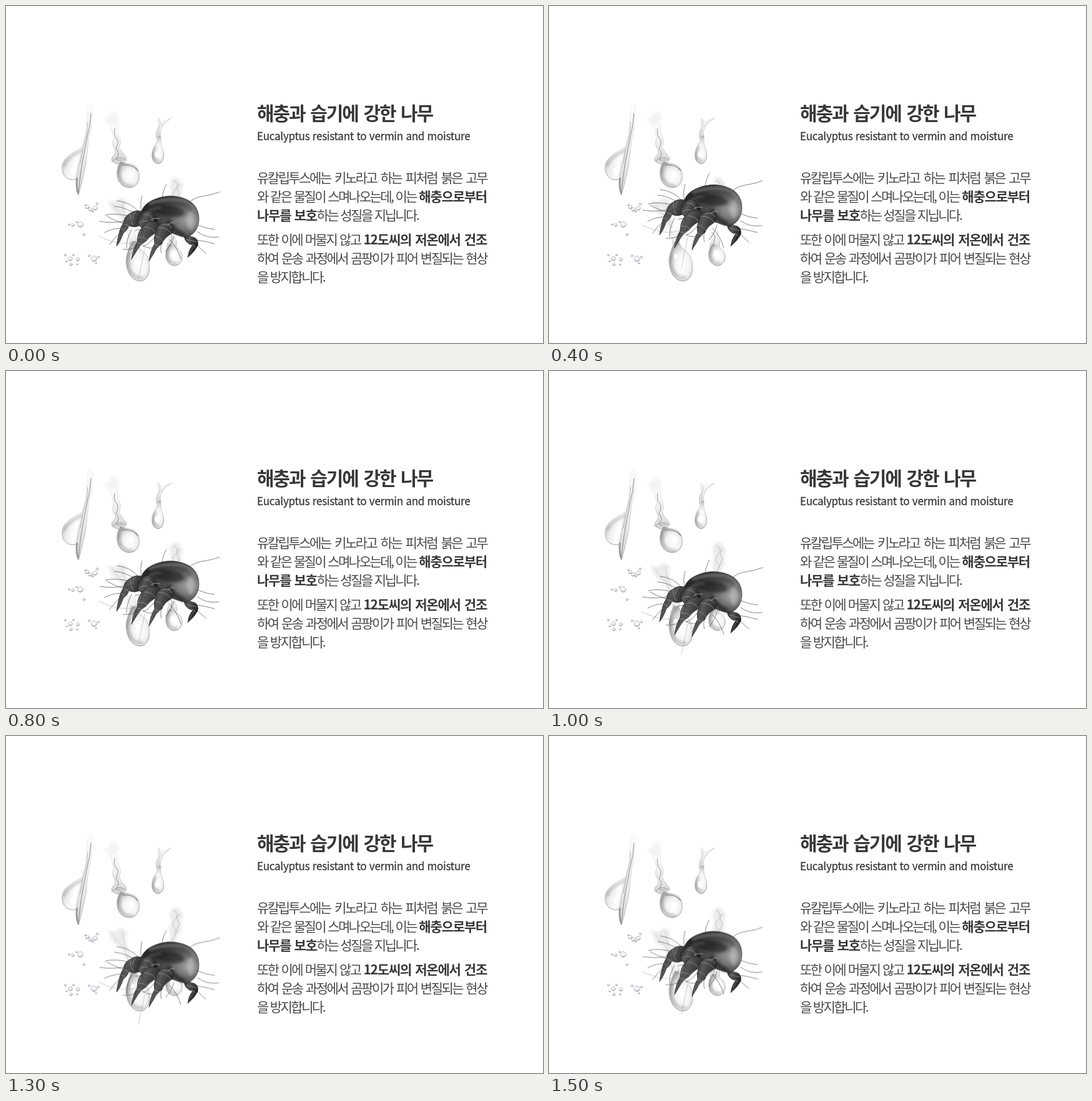
Animation of 860x540 px, one loop 1.6 s. Source, as an HTML page:

```html
<!DOCTYPE html>
<html lang="ko">
<head>
<meta charset="utf-8">
<title>해충과 습기에 강한 나무</title>
<style>
  html, body { margin: 0; width: 100%; height: 100%; overflow: hidden; background: #fff; }
  body { position: relative; color: #38383a; font-family: 'Noto Sans CJK KR', 'Noto Sans CJK', 'Noto Sans CJK JP', sans-serif; }
  svg { position: absolute; left: 0; top: 0; }
  h1, h2, p { position: absolute; left: 402px; margin: 0; white-space: nowrap; }
  h1 { top: 148px; font-size: 30px; line-height: 44px; font-weight: 700; letter-spacing: -2.1px; word-spacing: 2.4px; }
  h2 { top: 195px; font-size: 17px; line-height: 25px; font-weight: 400; letter-spacing: -.26px; -webkit-text-stroke: .3px; }
  p { width: 368px; font-size: 21px; line-height: 30px; font-weight: 300; letter-spacing: -2.5px; word-spacing: .5px; color: #48484a; }
  p span { display: block; }
  .full { text-align-last: justify; }
  b { font-weight: 700; letter-spacing: -1.2px; color: #38383a; }

  #mite { animation: crawl 1.6s infinite steps(4, end); }
  @keyframes crawl {
    0%, 50%, 100% { transform: translateY(0); }
    25% { transform: translateY(-18px); }
    75% { transform: translateY(34px); }
  }
</style>
</head>
<body>
<svg width="860" height="540" viewBox="0 0 860 540" fill="none" stroke-linecap="round" stroke-linejoin="round">
  <defs>
    <radialGradient id="water" cx=".58" cy=".6" r=".6">
      <stop offset="0" stop-color="#fff"/>
      <stop offset=".5" stop-color="#f4f4f4"/>
      <stop offset=".8" stop-color="#d2d2d2"/>
      <stop offset="1" stop-color="#a0a0a0"/>
    </radialGradient>
    <linearGradient id="pale" x1="0" y1="0" x2="1" y2=".3">
      <stop offset="0" stop-color="#b8b8b8"/>
      <stop offset=".35" stop-color="#ececec"/>
      <stop offset=".7" stop-color="#fff"/>
      <stop offset="1" stop-color="#dcdcdc"/>
    </linearGradient>
    <linearGradient id="stream" x1="0" y1="0" x2="0" y2="1">
      <stop offset="0" stop-color="#fcfcfc"/>
      <stop offset=".5" stop-color="#efefef"/>
      <stop offset="1" stop-color="#d4d4d4"/>
    </linearGradient>
    <linearGradient id="edge" x1="0" y1="0" x2="0" y2="1">
      <stop offset="0" stop-color="#ececec"/>
      <stop offset="1" stop-color="#929292"/>
    </linearGradient>
    <radialGradient id="body" cx=".82" cy=".6" r=".75">
      <stop offset="0" stop-color="#a0a0a0"/>
      <stop offset=".2" stop-color="#848484"/>
      <stop offset=".5" stop-color="#525252"/>
      <stop offset="1" stop-color="#262626"/>
    </radialGradient>
    <linearGradient id="limb" x1="0" y1="0" x2="1" y2=".5">
      <stop offset="0" stop-color="#151515"/>
      <stop offset=".45" stop-color="#585858"/>
      <stop offset="1" stop-color="#1c1c1c"/>
    </linearGradient>
    <filter id="soft" x="-20%" y="-20%" width="140%" height="140%"><feGaussianBlur stdDeviation=".5"/></filter>
    <filter id="haze" x="-40%" y="-40%" width="180%" height="180%"><feGaussianBlur stdDeviation="2.2"/></filter>
  </defs>
  <g id="drops" filter="url(#soft)"></g>
  <g id="bubbles"></g>
  <g id="mite"></g>
</svg>

<h1>해충과 습기에 강한 나무</h1>
<h2>Eucalyptus resistant to vermin and moisture</h2>
<p style="top:259px">
  <span class="full">유칼립투스에는 키노라고 하는 피처럼 붉은 고무</span>
  <span class="full">와 같은 물질이 스며나오는데, 이는 <b>해충으로부터</b></span>
  <span><b>나무를 보호</b>하는 성질을 지닙니다.</span>
</p>
<p style="top:358px">
  <span class="full">또한 이에 머물지 않고 <b>12도씨의 저온에서 건조</b></span>
  <span class="full">하여 운송 과정에서 곰팡이가 피어 변질되는 현상</span>
  <span>을 방지합니다.</span>
</p>

<script>
  const NS = 'http://www.w3.org/2000/svg';
  const layer = id => document.getElementById(id);
  const drops = layer('drops'), bubbles = layer('bubbles'), mite = layer('mite');

  function add(parent, tag, attrs) {
    const el = document.createElementNS(NS, tag);
    for (const key in attrs) el.setAttribute(key, attrs[key]);
    return parent.appendChild(el);
  }
  const fill = (parent, d, color, more) => add(parent, 'path', { d, fill: color, ...more });
  const line = (parent, d, color, width = 1, more) =>
    add(parent, 'path', { d, stroke: color, 'stroke-width': width, ...more });
  const spot = (parent, cx, cy, rx, ry, color, more) =>
    add(parent, 'ellipse', { cx, cy, rx, ry, fill: color, ...more });
  const haze = { filter: 'url(#haze)' };

  const stream = d => fill(drops, d, 'url(#stream)', { stroke: 'url(#edge)', 'stroke-width': .6 });
  function drop(d, paint, shade, x, y) {
    fill(drops, d, `url(#${paint})`, { stroke: 'url(#edge)', 'stroke-width': .9 });
    line(drops, shade, '#666', 2.4, { opacity: .6, ...haze });
    spot(drops, x, y, 4, 5, '#fff');
  }

  // left streak and its wide drop
  drop('M127 221C120 232 92 236 90 258C89 273 100 280 111 278C121 275 124 262 124 246Z', 'pale',
    'M124 230C112 236 98 243 93 256', 107, 264);
  stream('M132 159Q137 154 139 161L137 183Q138 197 133 210L130 234Q129 254 124 272Q120 290 116 303Q111 295 112 279Q116 255 121 237Q122 224 126 212Q130 194 129 181Z');
  line(drops, 'M136 172L134 192Q131 205 128 221T122 252Q119 270 116 298', '#888', 1);
  line(drops, 'M131 186Q131 204 125 222L119 252', '#aaa', .8);
  line(drops, 'M114 276Q112 290 116 301', '#888', 1.8);

  // middle stream
  fill(drops, 'M152 180Q162 185 168 170Q178 166 180 178Q177 188 180 194L169 197Q164 186 152 180Z', '#f4f4f4', haze);
  stream('M170 188Q177 188 179 194Q177 202 182 209Q185 218 181 226Q185 234 191 241Q196 246 190 249Q182 257 174 251Q166 249 171 241Q178 236 173 228Q168 219 173 211Q169 201 168 193Z');
  line(drops, 'M174 196Q172 206 177 212T176 228Q183 236 178 242T186 247M171 248Q180 239 191 246', '#8a8a8a', .9);
  drop('M183 248C176 260 176 275 183 284C192 294 206 292 211 283C217 271 212 257 203 254C195 251 190 252 183 248Z', 'water',
    'M182 262C178 276 188 289 202 288', 201, 270);
  line(drops, 'M187 255Q204 253 211 264', '#777', 1.1);

  // right stream
  stream('M242 179Q247 178 248 186Q256 182 266 179Q254 188 250 194Q246 201 247 209L242 214Q238 204 244 194Z');
  line(drops, 'M245 181L247 190Q243 199 244 210M264 180Q252 187 249 193', '#bbb', .8);
  drop('M243 208C243 221 233 228 234 241C235 250 241 254 246 252C254 248 254 236 250 227C247 220 249 214 248 207Z', 'water',
    'M239 226C234 238 238 249 246 249', 242, 238);

  // lower pair behind the mite
  fill(drops, 'M163 310Q174 318 183 307L194 313Q190 326 196 345L206 367L194 363Q188 340 176 334Q168 330 163 310Z', '#ebebeb', haze);
  line(drops, 'M171 318Q180 333 188 337L197 362M187 313Q186 329 197 347', '#ccc', .8);
  stream('M195 357Q202 350 208 357Q205 366 209 374Q208 382 211 390L197 391Q200 378 196 370Z');
  drop('M201 377C195 391 190 403 194 420C198 437 211 444 221 439C231 433 232 416 227 403C222 391 211 389 208 376Z', 'water',
    'M197 398C190 415 202 438 218 435', 211, 410);
  spot(drops, 203, 401, 3, 4, '#fff');
  fill(drops, 'M265 277Q275 271 279 281Q287 287 280 296Q284 309 276 318L270 335L260 333Q266 318 261 309Q267 297 262 289Z', '#ebebeb', haze);
  line(drops, 'M268 279Q279 286 271 294T270 308T264 329M278 285Q270 292 278 300L272 315', '#b4b4b4', .8);
  stream('M259 358Q267 353 271 361L270 371Q277 379 271 389L259 391Q256 381 262 375Q256 367 259 358Z');
  line(drops, 'M261 363Q268 367 265 375T267 388', '#8a8a8a', .9);
  drop('M262 380C255 389 254 402 259 410C266 419 277 417 281 408C285 398 279 389 271 385Z', 'water',
    'M260 390C254 402 264 415 273 412', 268, 397);

  // bubbles: x, y, radius
  [
    [130, 322, 3], [135, 326, 3], [143, 324, 3.4], [146, 317, 1.8], [127, 319, 1.2], [139, 329, 1.4],
    [119, 350, 4.6], [107, 351, 2.4], [101, 350, 1.4], [125, 366, 1.8], [113, 346, 1.2],
    [95, 399, 1.6], [103, 405, 3.4], [104, 414, 2.2], [115, 406, 2.8], [97, 409, 1.2], [114, 414, 1.2],
    [141, 405, 4.6], [133, 400, 1.6], [148, 402, 1.6], [144, 412, 1.2], [108, 399, 1.4]
  ].forEach(([cx, cy, r], i) => {
    add(bubbles, 'circle', { cx, cy, r, fill: '#f1f1f3', stroke: i % 4 == 1 ? '#b6b2c8' : '#bbb', 'stroke-width': .8 });
    line(bubbles, `M${cx - r * .7} ${cy + r * .5}Q${cx} ${cy + r * 1.3} ${cx + r * .8} ${cy + r * .3}`, '#888', .8);
    add(bubbles, 'circle', { cx: cx - r * .2, cy: cy - r * .2, r: r * .35, fill: '#fff' });
  });

  // hairs behind the body
  line(mite, [
    'M287 321Q298 307 314 305T342 298', 'M250 306Q252 294 257 286', 'M217 330Q214 316 218 304',
    'M213 330Q199 314 178 312', 'M207 333Q190 322 174 321', 'M198 337Q176 331 159 335',
    'M192 344Q170 349 150 345', 'M190 349Q174 344 162 337', 'M186 356Q170 356 158 363',
    'M185 361Q173 372 166 382', 'M201 358Q193 372 193 388', 'M212 381Q205 392 187 390',
    'M245 386Q229 391 219 384', 'M262 374Q274 386 280 405', 'M307 351Q321 357 334 358',
    'M307 362Q321 373 341 370', 'M305 375Q316 376 334 381', 'M306 383Q313 391 320 396',
    'M269 369Q266 382 256 393'
  ].join(''), '#444', .65);
  line(mite, 'M222 389Q217 414 212 437M214 376Q188 388 149 369', '#aaa', .6);

  const part = (d, paint = 'limb') => fill(mite, d, `url(#${paint})`, { stroke: '#1c1c1c', 'stroke-width': .6 });
  const glint = (d, color = '#a0a0a0', width = .9) => line(mite, d, color, width, { opacity: .8 });

  // rear leg
  part('M283 361Q292 369 302 371Q309 375 307 384Q302 394 291 403Q292 392 299 383Q291 382 287 375Z');
  glint('M289 374Q298 376 305 378M298 382L303 386');

  // body
  part('M216 336C216 323 226 314 240 309C255 303 272 303 287 309C300 314 309 325 309 341C309 357 299 370 286 370C271 368 261 359 246 361C230 363 217 354 216 336Z', 'body');
  spot(mite, 262, 329, 24, 9, '#161616', { opacity: .55, transform: 'rotate(8 262 329)', ...haze });
  line(mite, 'M230 317Q252 307 282 311Q297 315 303 329', '#a8a8a8', 2.6, { opacity: .75, ...haze });
  line(mite, 'M226 331Q236 322 248 324', '#999', 2.4, { opacity: .5, ...haze });
  spot(mite, 296, 344, 6, 15, '#d0d0d0', { opacity: .45, ...haze });
  line(mite, 'M261 345Q268 359 284 367', '#0c0c0c', 6, { opacity: .6, ...haze });

  // front leg
  part('M220 330Q209 325 199 332Q189 337 188 348Q181 356 177 385Q183 378 188 364Q194 360 197 352Q207 357 217 350Z');
  glint('M199 334Q199 345 204 351M189 349Q193 350 197 353M184 357Q188 358 190 360M207 331Q202 336 203 342');

  // head plates
  part('M218 331Q228 324 237 334Q246 341 239 351Q229 360 217 355Q207 349 212 338Z');
  glint('M221 334Q232 332 236 345M214 347Q223 340 233 350');

  // second leg
  part('M220 352Q233 340 247 349Q249 358 239 364Q229 370 224 377Q215 382 210 391L201 406Q203 389 210 378Q210 362 220 352Z');
  glint('M222 354Q234 354 239 363M211 371Q219 369 226 375M210 380Q215 380 218 383M216 360Q213 367 212 373');

  // third leg
  part('M245 351Q257 343 266 350Q272 361 263 366Q252 373 250 381Q241 386 237 396L229 409Q231 392 238 381Q236 372 239 365Q239 357 245 351Z');
  glint('M244 355Q257 354 264 364M239 369Q247 369 251 378M238 382Q242 382 244 385M252 350Q262 348 266 356');

  // highlights on claws and hairs crossing the legs
  line(mite, 'M182 361L179 376M206 386L203 399M235 386L232 401M302 382L295 395', '#777', .9, { opacity: .6 });
  line(mite, 'M231 344Q236 338 246 341M259 351Q267 344 270 348', '#bbb', .8);
  line(mite, 'M202 342Q191 351 186 347M239 369Q228 383 220 385M222 363Q213 356 207 360M250 374Q246 390 249 396', '#333', .6);
</script>
</body>
</html>
```
